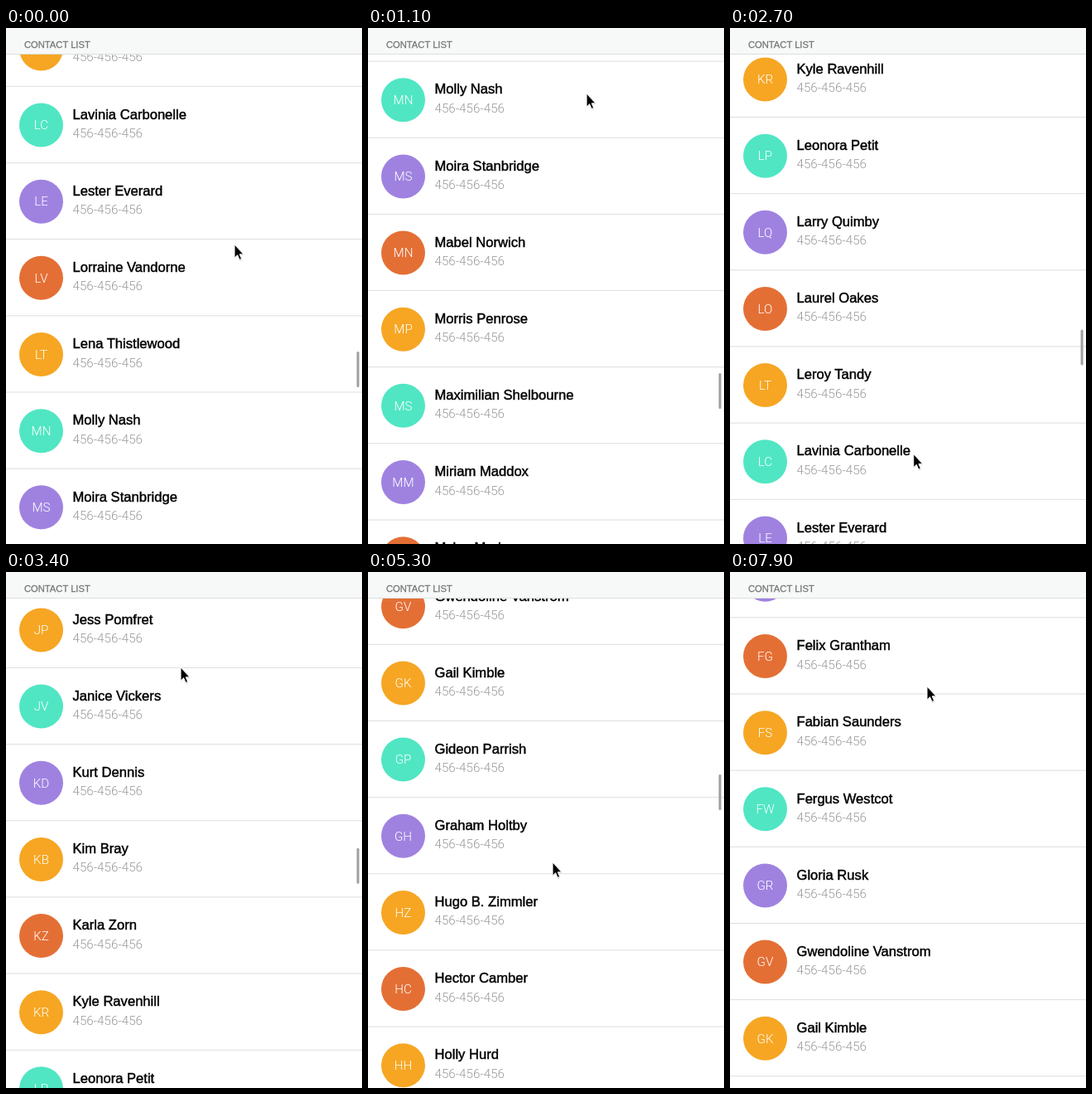
Write an HTML page that moves like this. It is 430x622 px and loops after 8 s.

```html
<!DOCTYPE html>
<html lang="en">
<head>
<meta charset="utf-8">
<title>Contact list</title>
<style>
html, body { margin: 0; width: 100%; height: 100%; overflow: hidden; background: #fff; }
svg { display: block; }
text { font-family: "Liberation Sans", Arial, sans-serif; }
.name { font-size: 16.6px; stroke: #000; stroke-width: .45px; }
.phone, .initials { font-family: Roboto, "Liberation Sans", sans-serif; font-weight: 300; font-size: 15.2px; }
.phone { fill: #999; }
.initials { fill: #fff; text-anchor: middle; }
.title { font-size: 11.2px; fill: #777; stroke: #777; stroke-width: .3px; }
</style>
</head>
<body>
<svg width="430" height="622" viewBox="0 0 430 622">
  <g id="list"></g>
  <rect width="430" height="32" fill="#f7f8f8"/>
  <rect y="31" width="430" height="1" fill="#dcdddd"/>
  <text class="title" x="22" y="24">CONTACT LIST</text>
  <rect id="thumb" x="423.6" width="3" height="43" rx="1.5" fill="#a0a0a0"/>
  <g id="cursor">
    <path d="M0 1V17L4 14 6.5 20 9 19 6.5 13H11.5Z" fill="#000" opacity=".15"/>
    <path d="M0 0V16L3.6 12.7 6 18.4 8.6 17.3 6.2 11.8H11Z" stroke="#fff" stroke-width="1" stroke-linejoin="round"/>
  </g>
</svg>
<script>
const LOOP = 8000, STEP = 100, PITCH = 92.15;
const COLORS = ['#e46f35', '#f6a623', '#50e6c3', '#9f82e0'];
// A trailing * marks a contact outside the colour cycle.
const NAMES = `Faye Ellison,Felix Grantham,Fabian Saunders,Fergus Westcot,Gloria Rusk,Gwendoline Vanstrom,
Gail Kimble,Gideon Parrish,Graham Holtby,Hugo B. Zimmler*,Hector Camber,Holly Hurd,Hanna Hobbs,
Hal Kerrigan,Ingrid Chalmers,Irving Coulter,Josephina Merriday,Janet Duff,Jude Islington,
Jared Abernethy*,Jess Pomfret,Janice Vickers,Kurt Dennis,Kim Bray*,Karla Zorn,Kyle Ravenhill,
Leonora Petit,Larry Quimby,Laurel Oakes,Leroy Tandy,Lavinia Carbonelle,Lester Everard,
Lorraine Vandorne,Lena Thistlewood,Molly Nash,Moira Stanbridge,Mabel Norwich,Morris Penrose,
Maximilian Shelbourne,Miriam Maddox,Myles Morley`.split(/,\s*/);

// Each key: time, then value(s).
const SCROLL = [[0, 2568.3], [400, 2747], [700, 2879], [1100, 2967.2], [1500, 3010], [1900, 3024.9],
  [2000, 2990], [2400, 2560], [2800, 2060], [3400, 1693.9], [3800, 1400], [4300, 954.4],
  [4700, 640], [5200, 339.8], [6300, 339.8], [6900, -88.5], [LOOP, -88.5]];
const CURSOR = [[0, 276, 261], [400, 265, 80], [1100, 264, 79], [1500, 250, 110], [1900, 236.5, 126],
  [2000, 236, 150], [2450, 226, 560], [2800, 220, 480], [3300, 211, 115], [3400, 211, 115],
  [4000, 215, 640], [4600, 218, 640], [5200, 223, 350], [5500, 223, 350], [6200, 238, 138],
  [6300, 238, 138], [6900, 230, 565], [7200, 230, 565], [7800, 238, 138], [LOOP, 238, 138]];
const THUMB = [[0, 1], [5500, 1], [5900, 0], [6300, 0], [6400, 1], [6900, 1], [7150, 0], [LOOP, 0]];

// Monotone cubic interpolation through the keys.
function sample(keys, t, k = 1) {
  const slope = i => (keys[i + 1][k] - keys[i][k]) / (keys[i + 1][0] - keys[i][0]);
  const tangent = i => {
    if (i === 0) return slope(0);
    if (i === keys.length - 1) return slope(i - 1);
    const a = slope(i - 1), b = slope(i);
    return a * b > 0 ? 2 * a * b / (a + b) : 0;
  };
  let i = 0;
  while (i < keys.length - 2 && t >= keys[i + 1][0]) i++;
  const [p, q] = [keys[i], keys[i + 1]], d = q[0] - p[0], u = (t - p[0]) / d, v = 1 - u;
  return p[k] * (1 + 2 * u) * v * v + q[k] * (3 - 2 * u) * u * u
    + d * u * v * (tangent(i) * v - tangent(i + 1) * u);
}

const el = id => document.getElementById(id);
let cycle = 3;
el('list').innerHTML = NAMES.map((entry, i) => {
  const name = entry.replace('*', '');
  const words = name.split(' ');
  const initials = words[0][0] + words[words.length - 1][0];
  const color = COLORS[name === entry ? cycle++ % 4 : 1];
  return `<g transform="translate(0 ${(i - 1) * PITCH})">
    <circle cx="42.5" cy="13" r="26.5" fill="${color}"/>
    <text class="initials" x="42.5" y="18.3">${initials}</text>
    <text class="name" x="80.5" y="5.7">${name}</text>
    <text class="phone" x="80.5" y="28">456-456-456</text>
    <rect y="58" width="430" height="1" fill="#dedede"/></g>`;
}).join('');

function draw(now) {
  const t = Math.floor(now % LOOP / STEP) * STEP;
  const scroll = sample(SCROLL, t);
  el('list').setAttribute('transform', `translate(0 ${-scroll})`);
  el('thumb').setAttribute('y', 390 + (scroll - 2568.3) / 15.27);
  el('thumb').setAttribute('opacity', sample(THUMB, t));
  el('cursor').setAttribute('transform', `translate(${sample(CURSOR, t, 1)} ${sample(CURSOR, t, 2)})`);
}

const start = performance.now();
function tick() {
  draw(performance.now() - start);
  requestAnimationFrame(tick);
}
tick();
</script>
</body>
</html>
```
